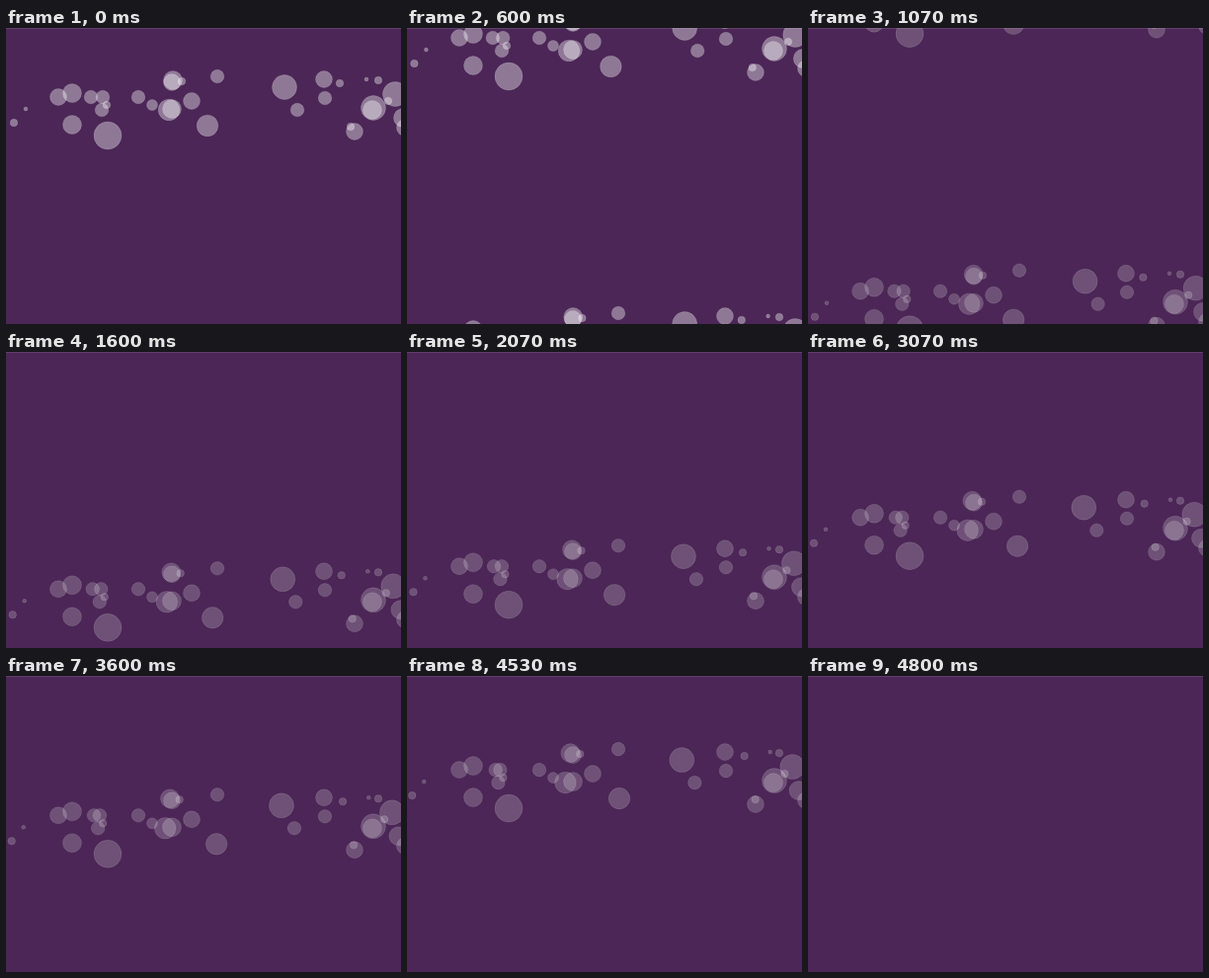
An HTML page with a canvas for the animation above (4990 ms loop, 400 by 300 pixels).

```html
<!DOCTYPE html>
<html lang="en">
<head>
<meta charset="utf-8">
<title>Rising bubbles</title>
<style>
  html, body { margin: 0; width: 100%; height: 100%; overflow: hidden; background: #4b2656; }
  canvas { display: block; width: 400px; height: 300px; }
</style>
</head>
<body>
<canvas id="stage" width="400" height="300"></canvas>
<script>
const ctx = document.getElementById('stage').getContext('2d');
const W = 400, H = 300;
const LOOP = 4990, BLANK = 4800, FPS = 15, TURN = 1000;

// radius: bubbles as x, y and an optional sideways drift
const sizes = {
  2: [[20, 82, -3], [365, 52, 3]],
  3.8: [[8, 96, -3], [102, 78, -5], [338, 56, 4], [387, 74, -5], [178, 54, -3], [349, 100, 4], [377, 53]],
  5.5: [[148, 78]],
  6.8: [[86, 70, 4], [98, 70, -4], [97, 83, -5], [134, 70], [214, 49], [295, 83, -4], [323, 71]],
  8.5: [[53, 70], [168, 55], [188, 74], [322, 52], [353, 105], [404, 101]],
  9.5: [[67, 98], [67, 66], [168, 82], [169, 53, -4], [371, 83], [402, 91, -6]],
  10.8: [[165, 83, -5], [204, 99, 12]],
  12.5: [[282, 60, -4], [372, 81], [394, 67, -4]],
  14: [[103, 109]]
};

const climb = t => t < TURN ? t * 0.1 : 100 + (t - TURN) * 0.0495;

function circle(x, y, r) {
  if (y + r < 0 || y - r > H) return;
  ctx.beginPath();
  ctx.arc(x, y, r, 0, Math.PI * 2);
  ctx.fill();
  ctx.stroke();
}

function drawBubbles(t) {
  const tick = Math.floor((t + 4) * FPS / 1000) * 1000 / FPS;
  const rise = climb(tick);
  const bright = tick < TURN;
  ctx.fillStyle = `rgba(255,255,255,${bright ? 0.38 : 0.2})`;
  ctx.strokeStyle = `rgba(255,255,255,${bright ? 0.14 : 0.1})`;
  for (const [r, group] of Object.entries(sizes)) {
    for (const [x, y, drift = 0] of group) {
      const px = x + drift * rise / H;
      const py = (y - rise + H) % H;
      for (const shift of [-H, 0, H]) circle(px, py + shift, +r);
    }
  }
}

function draw(now) {
  const t = now % LOOP;
  ctx.fillStyle = '#4b2656';
  ctx.fillRect(0, 0, W, H);
  if (t < BLANK) drawBubbles(t);
  ctx.fillStyle = 'rgba(255,255,255,0.12)';
  ctx.fillRect(0, 0, W, 1);
  requestAnimationFrame(draw);
}

draw(performance.now());
</script>
</body>
</html>
```
